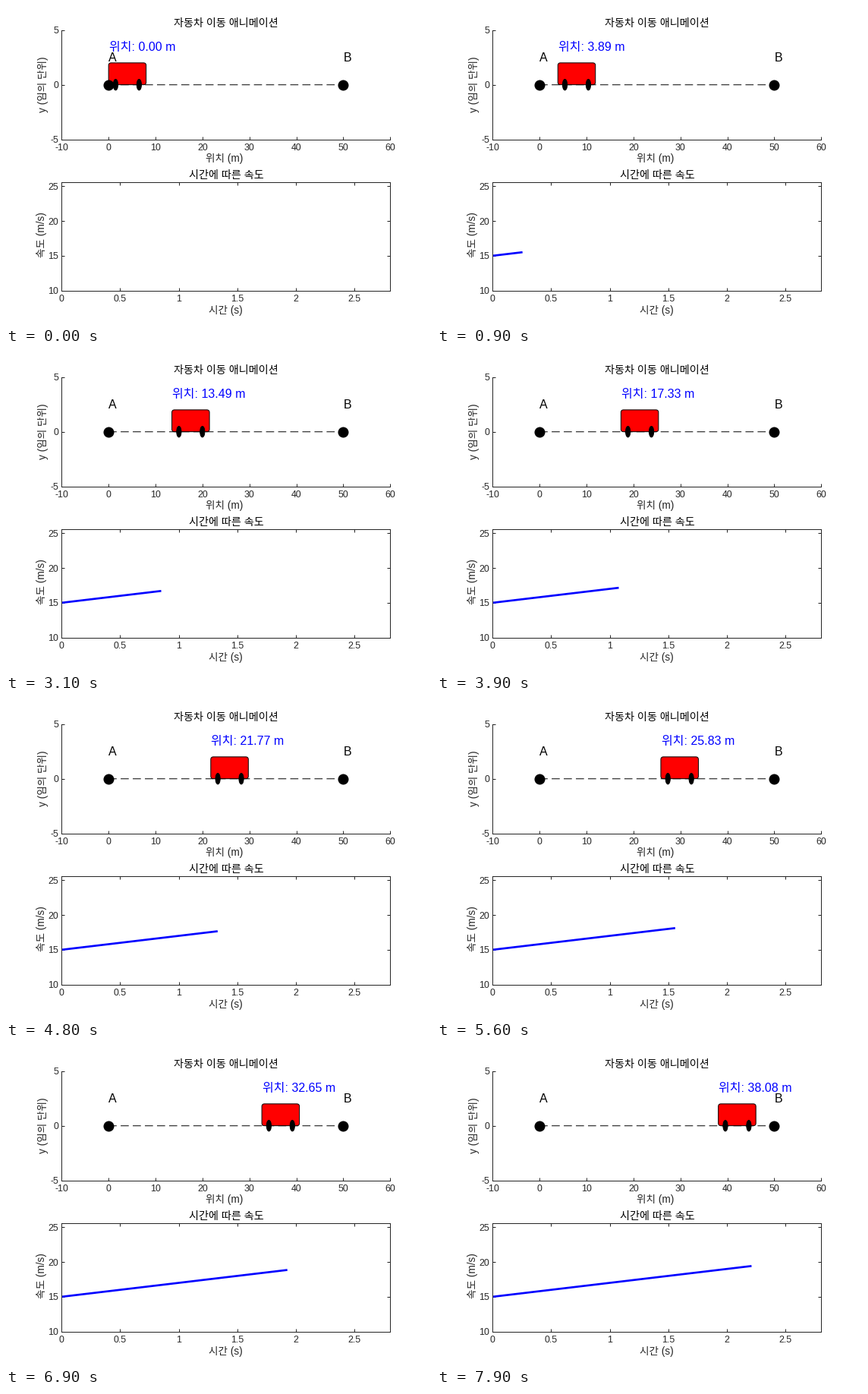
Animation, 560 px wide and 420 px high, one loop 8000 ms. Source, as a matplotlib script:

```python
import numpy as np
import matplotlib.pyplot as plt
from matplotlib.animation import FuncAnimation
from matplotlib.patches import Ellipse, FancyBboxPatch

W, H, DPI = 560, 420, 80
PX = 72 / DPI  # points per pixel
INK = "#262626"
LEFT, RIGHT = 73.3, 506.3

plt.rcParams.update({
    "font.family": ["Liberation Sans", "Noto Sans CJK JP"],
    "axes.unicode_minus": False,
    "axes.edgecolor": INK,
    "axes.linewidth": PX,
})

# Uniformly accelerated drive from A to B
V0, ACC, DIST = 15, 2, 50
T_END = (-V0 + np.sqrt(V0**2 + 2 * ACC * DIST)) / ACC
TIMES = np.linspace(0, T_END, 100)
SPEEDS = V0 + ACC * TIMES
PLACES = V0 * TIMES + ACC * TIMES**2 / 2

FRAMES, INTERVAL = 80, 100
HOLD = 18  # this frame repeats the one before it

fig = plt.figure(figsize=(W / DPI, H / DPI), dpi=DPI, facecolor="white")


def make_axes(top, bottom, xlim, ylim, xticks, yticks, box):
    """Axes between two heights, in pixels from the top of the stage."""
    ax = fig.add_axes([LEFT / W, 1 - bottom / H,
                       (RIGHT - LEFT) / W, (bottom - top) / H])
    ax.set(xlim=xlim, ylim=ylim, xticks=xticks, yticks=yticks)
    ax.tick_params(direction="in", length=4.3 * PX, width=PX, pad=5.5 * PX,
                   color=INK, labelcolor=INK, labelsize=12.4 * PX,
                   top=box, right=box)
    ax.tick_params(axis="y", pad=4 * PX)
    ax.spines[["top", "right"]].set_visible(box)
    return ax


def label(x, y, text, size=13.6, color=INK, rotation=0):
    fig.text(x / W, 1 - y / H, text, color=color, rotation=rotation,
             size=size * PX, ha="center", va="center")


def title(y, text):
    label(290, y, text, size=14.1, color="black")


road = make_axes(31.7, 175.6, (-10, 60), (-5, 5),
                 range(-10, 61, 10), (-5, 0, 5), False)
graph = make_axes(231.7, 374.6, (0, T_END), (10, SPEEDS[-1] + 5),
                  np.arange(0, 2.6, 0.5), (10, 15, 20, 25), True)
graph.xaxis.set_major_formatter(lambda v, _: f"{v:g}")

title(22.5, "자동차 이동 애니메이션")
label(288, 201, "위치 (m)")
label(49, 103, "y (임의 단위)", rotation=90)
title(222.5, "시간에 따른 속도")
label(289, 400.5, "시간 (s)")
label(46.5, 301.5, "속도 (m/s)", rotation=90)

road.plot([0, DIST], [0, 0], color="#404040", lw=1.33 * PX, zorder=2,
          dashes=(8, 4), dash_capstyle="butt", snap=False)
road.plot([0, DIST], [0, 0], "o", color="black", ms=14 * PX, mew=0, zorder=5)

text_style = dict(size=16 * PX, ha="left", va="center_baseline", zorder=6)
for x, name in ((0, "A"), (DIST, "B")):
    road.text(x, 2.53, name, color="black", **text_style)

# The mutation aspect makes the rounded corners circular on screen
ASPECT = (10 / 143.9) / (70 / (RIGHT - LEFT))
body = FancyBboxPatch((0, 0), 8, 2, fc="red", ec="black", lw=PX, zorder=3,
                      boxstyle="round,pad=0,rounding_size=0.55",
                      mutation_aspect=ASPECT)
road.add_patch(body)
wheels = [Ellipse((0, 0), 1, 1, fc="black", ec="black", lw=PX, zorder=4)
          for _ in range(2)]
for wheel in wheels:
    road.add_patch(wheel)
readout = road.text(0, 3.49, "", color="blue", **text_style)
curve, = graph.plot([], [], color="blue", lw=2.67 * PX,
                    solid_capstyle="butt", zorder=2)


def update(i):
    k = i if i < HOLD else i - 1
    x = PLACES[k]
    body.set_x(x)
    for wheel, dx in zip(wheels, (1.5, 6.5)):
        wheel.set_center((x + dx, 0))
    readout.set_x(x + 0.1)
    readout.set_text(f"위치: {x:.2f} m")
    curve.set_data(TIMES[:k + 1], SPEEDS[:k + 1])
    return body, *wheels, readout, curve


anim = FuncAnimation(fig, update, frames=FRAMES, interval=INTERVAL,
                     init_func=lambda: update(0), repeat=True, repeat_delay=0)
plt.show()
```
